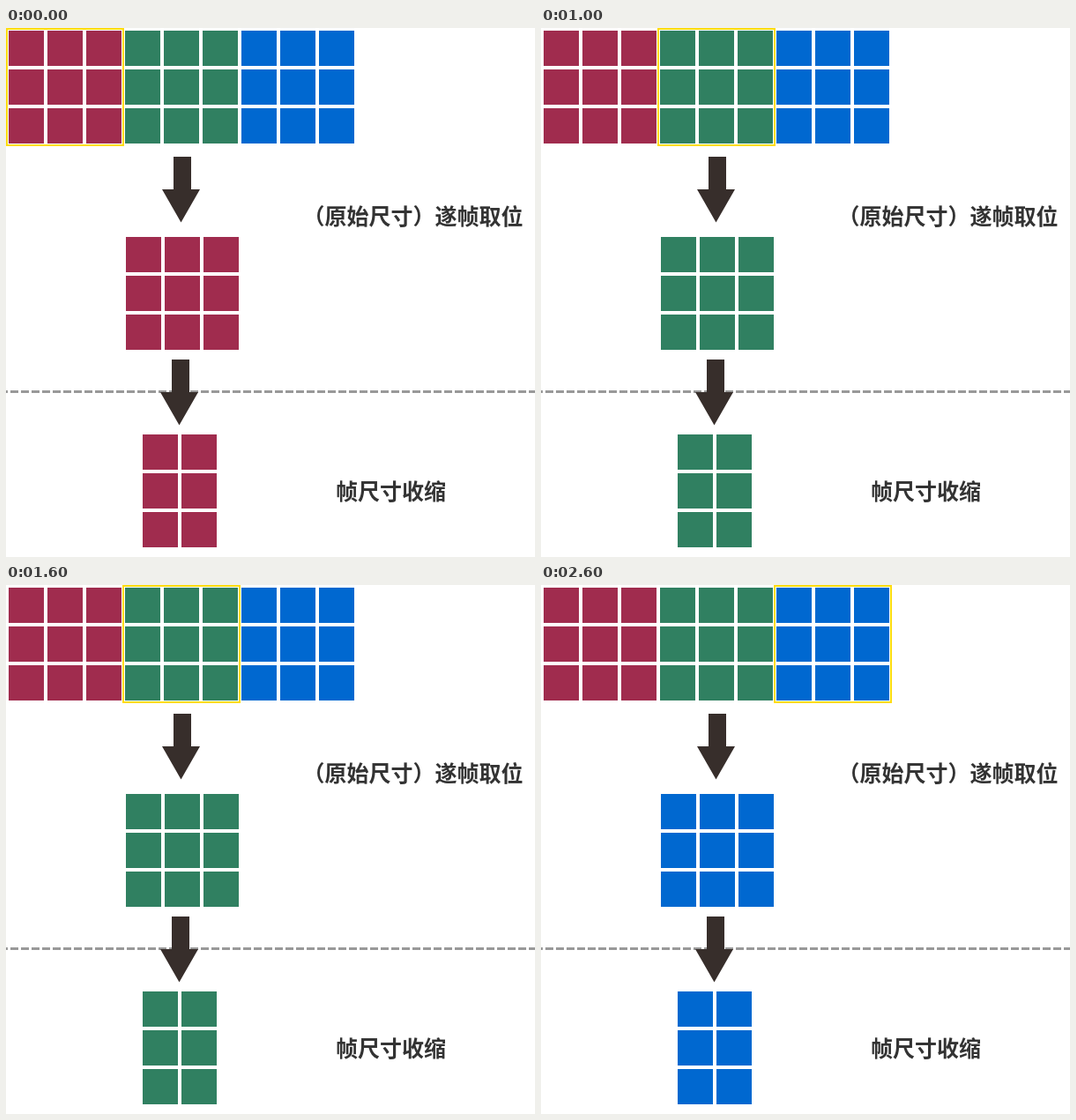
Recreate the animation shown at these times as an HTML page. Size 600 px wide and 600 px high, loop 3000 ms.

```html
<!DOCTYPE html>
<html lang="zh-CN">
<head>
<meta charset="utf-8">
<title>逐帧取位</title>
<style>
  html, body { margin: 0; width: 100%; height: 100%; overflow: hidden; background: #fff; }
  svg { display: block; width: 100vw; height: 100vh; }
  text { font: bold 25px "Noto Sans CJK SC", "Noto Sans CJK", "Noto Sans CJK JP", sans-serif; fill: #333; }
</style>
</head>
<body>
<svg viewBox="0 0 600 600">
  <defs>
    <path id="arrow" d="M13 0H33V37H43L21.5 74.5L0 37H13Z" fill="#372e2b"/>
  </defs>
  <g id="strip" shape-rendering="crispEdges"></g>
  <g id="picked" shape-rendering="crispEdges"></g>
  <rect id="cursor" y="1" width="132" height="132" fill="none" stroke="#ffdc0f" stroke-width="2"/>
  <path d="M-7 412.5H600" stroke="#999" stroke-width="3" stroke-dasharray="9 3"/>
  <use href="#arrow" x="177" y="146"/>
  <use href="#arrow" x="175" y="376"/>
  <text x="336.5" y="223">（原始尺寸）遂帧取位</text>
  <text x="374" y="535">帧尺寸收缩</text>
</svg>
<script>
  const COLORS = ['#a02c4e', '#308061', '#0068d0'];
  const CELL = 40, PITCH = 44, HOLD = 1000;
  const byId = id => document.getElementById(id);
  const strip = byId('strip'), picked = byId('picked'), cursor = byId('cursor');

  function addGrid(parent, x, y, cols, fill) {
    let d = '';
    for (let row = 0; row < 3; row++)
      for (let col = 0; col < cols; col++)
        d += `M${x + col * PITCH} ${y + row * PITCH}h${CELL}v${CELL}h${-CELL}z`;
    const path = document.createElementNS('http://www.w3.org/2000/svg', 'path');
    path.setAttribute('d', d);
    if (fill) path.setAttribute('fill', fill);
    parent.append(path);
  }

  COLORS.forEach((color, i) => addGrid(strip, 3 + i * 3 * PITCH, 3, 3, color));
  addGrid(picked, 136, 237, 3);
  addGrid(picked, 155, 461, 2);

  function render(time) {
    const step = Math.floor(time / HOLD) % COLORS.length;
    cursor.setAttribute('x', 1 + step * 3 * PITCH);
    picked.setAttribute('fill', COLORS[step]);
  }

  let start;
  function tick(now) {
    start ??= now;
    render(now - start);
    requestAnimationFrame(tick);
  }
  render(0);
  requestAnimationFrame(tick);
</script>
</body>
</html>
```
